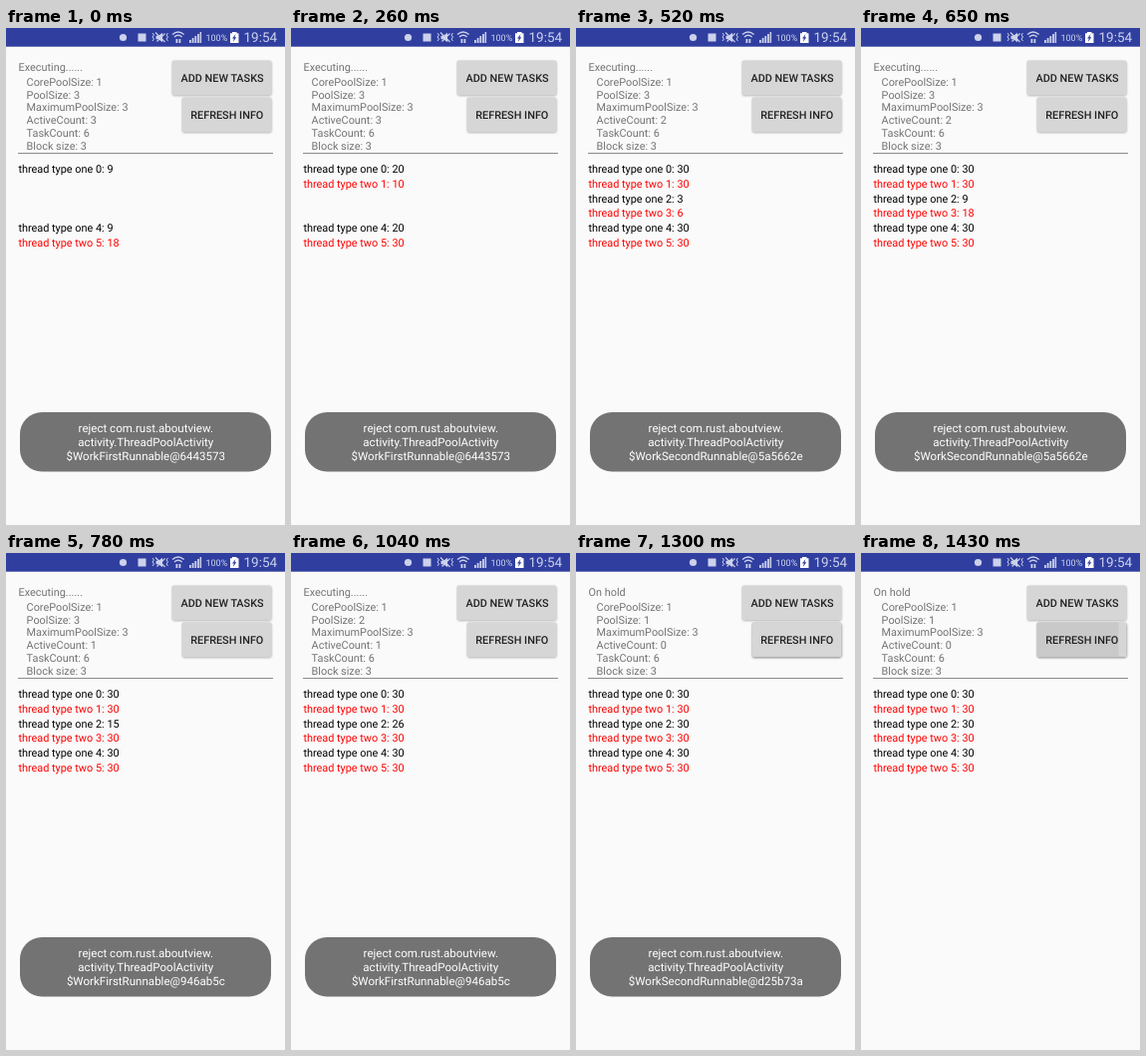
An HTML page for the animation above (1.56 s loop, 280x498 px).

```html
<!DOCTYPE html>
<html lang="en">
<head>
<meta charset="utf-8">
<title>Thread pool demo</title>
<style>
  html, body { margin: 0; width: 100%; height: 100%; overflow: hidden; background: #fafafa; }
  svg { display: block; width: 100vw; height: 100vh; }
  text {
    font-family: Roboto, "Noto Sans", sans-serif; font-size: 10.89px;
    white-space: pre; text-rendering: geometricPrecision;
  }
  .info text { fill: #737373; }
  .button text { font-weight: 500; fill: #212121; text-anchor: middle; }
  .toast text { font-size: 11.55px; fill: #fff; text-anchor: middle; }
</style>
</head>
<body>
<svg viewBox="0 0 280 498">
  <defs>
    <filter id="blur" x="-10%" y="-20%" width="120%" height="150%"><feGaussianBlur stdDeviation=".8"/></filter>
  </defs>
  <rect width="280" height="498" fill="#fafafa"/>

  <g fill="#ccd2ec">
    <rect width="280" height="18.7" fill="#303f9f"/>
    <circle cx="117.5" cy="9.5" r="3.6"/>
    <rect x="132.5" y="5.5" width="8" height="8"/>
    <g fill="none" stroke="#ccd2ec">
      <path d="M147 5l1.500 2-1.500 2 1.500 2-1.500 2M162.500 5l-1.500 2 1.500 2-1.500 2 1.500 2" stroke-width="1"/>
      <path d="M150 4.500l9.500 9.500M159.500 5.500l-8 8" stroke-width="1.100"/>
      <path d="M167 6.500Q172.800 1.500 178.600 6.500M169 9Q172.800 5.700 176.600 9" stroke-width="1.400"/>
    </g>
    <path d="M150.500 7.700h2.500l4-3v9.600l-4-3h-2.500z"/>
    <path d="M170.500 11h1.800v4h-1.800zM173.500 11h1.800v4h-1.800z"/>
    <path d="M184 12h1.800v3h-1.800zM186.700 10h1.800v5h-1.800zM189.400 8h1.800v7h-1.800zM192.100 6h1.800v9h-1.800zM194.600 4h1.500v11h-1.500z"/>
    <text x="200.500" y="13" style="font-size:9px">100%</text>
    <path d="M227 4h4.500v1.300h2v9.700h-8.500v-9.700h2z" fill="#fff"/>
    <path d="M230.500 6l-3.500 4.500h1.800l-1 3.500 3.500-4.700h-1.800z" fill="#303f9f"/>
    <text x="238.500" y="14.300" style="font-size:13.500px">19:54</text>
  </g>

  <g class="info" id="info"></g>
  <rect x="12" y="125" width="256" height="1" fill="#8c8c8c"/>
  <g id="rows"></g>

  <g class="button">
    <rect x="167" y="33.500" width="99.500" height="34.500" rx="2" opacity=".3" filter="url(#blur)"/>
    <rect x="166.500" y="32.500" width="100" height="34.800" rx="1.500" fill="#d6d6d6"/>
    <text x="217" y="54">ADD NEW TASKS</text>
  </g>
  <g class="button">
    <rect id="shadow" x="177" y="70.500" width="89.500" height="34.500" rx="2" filter="url(#blur)"/>
    <rect x="176.500" y="69.500" width="90" height="34.800" rx="1.500" fill="#d6d6d6"/>
    <rect id="ripple" x="176.500" y="69.500" width="82" height="34.800" rx="1.500" fill="#c9c9c9"/>
    <text x="221.800" y="91.400">REFRESH INFO</text>
  </g>

  <g class="toast" id="toast">
    <rect x="14" y="385" width="252" height="59.500" rx="22" fill="#737373"/>
    <text x="140.300" y="405.400">reject com.rust.aboutview.</text>
    <text x="140.300" y="419.200">activity.ThreadPoolActivity</text>
    <text id="worker" x="140.300" y="433"></text>
  </g>
</svg>
<script>
const STEP = 130, STEPS = 12, DONE = 30;
const $ = id => document.getElementById(id);

function addText(parent, x, y, fill) {
  const el = document.createElementNS("http://www.w3.org/2000/svg", "text");
  el.setAttribute("x", x);
  el.setAttribute("y", y);
  if (fill) el.setAttribute("fill", fill);
  return parent.appendChild(el);
}

// Each task counts up from its first step, then stays at DONE.
const longRun = { from: 0, counts: [9, 15, 20, 27] };
const tasks = [
  longRun,
  { from: 2, counts: [10, 24] },
  { from: 4, counts: [3, 9, 15, 21, 26] },
  { from: 4, counts: [6, 18] },
  longRun,
  { from: 0, counts: [18] }
];

// Pool state from a given step on.
const pools = [
  { from: 0, size: 3, active: 3 },
  { from: 4, size: 3, active: 2 },
  { from: 6, size: 3, active: 1 },
  { from: 7, size: 2, active: 1 },
  { from: 9, size: 1, active: 0 }
];

const workers = ["First@6443573", "Second@5a5662e", "First@946ab5c", "Second@d25b73a"]
  .map(s => "$Work" + s.replace("@", "Runnable@"));

const infoLines = Array.from({ length: 7 }, (_, i) =>
  i ? addText($("info"), 20.6, 57.8 + 12.8 * (i - 1)) : addText($("info"), 12.6, 43));
const rows = tasks.map((_, i) =>
  addText($("rows"), 12.4, 145.1 + 14.78 * i, i % 2 ? "#f00" : "#000"));

function taskText(task, i, step) {
  if (step < task.from) return "";
  const count = task.counts[step - task.from] ?? DONE;
  return `thread type ${i % 2 ? "two" : "one"} ${i}: ${count}`;
}

function draw(step) {
  const pool = pools.filter(p => p.from <= step).pop();
  const info = [
    pool.active ? "Executing......" : "On hold",
    "CorePoolSize: 1",
    "PoolSize: " + pool.size,
    "MaximumPoolSize: 3",
    "ActiveCount: " + pool.active,
    "TaskCount: 6",
    "Block size: 3"
  ];
  infoLines.forEach((el, i) => el.textContent = info[i]);
  rows.forEach((el, i) => el.textContent = taskText(tasks[i], i, step));

  const last = step === STEPS - 1;
  $("worker").textContent = workers[Math.floor(step / 3)];
  $("toast").style.display = last ? "none" : "";
  $("ripple").style.display = last ? "" : "none";
  $("shadow").setAttribute("opacity", step >= 10 ? 0.55 : 0.3);
}

let shown = -1, start;
function tick(now) {
  start ??= now;
  const step = Math.floor((now - start) / STEP) % STEPS;
  if (step !== shown) draw(shown = step);
  requestAnimationFrame(tick);
}
draw(0);
requestAnimationFrame(tick);
</script>
</body>
</html>
```
